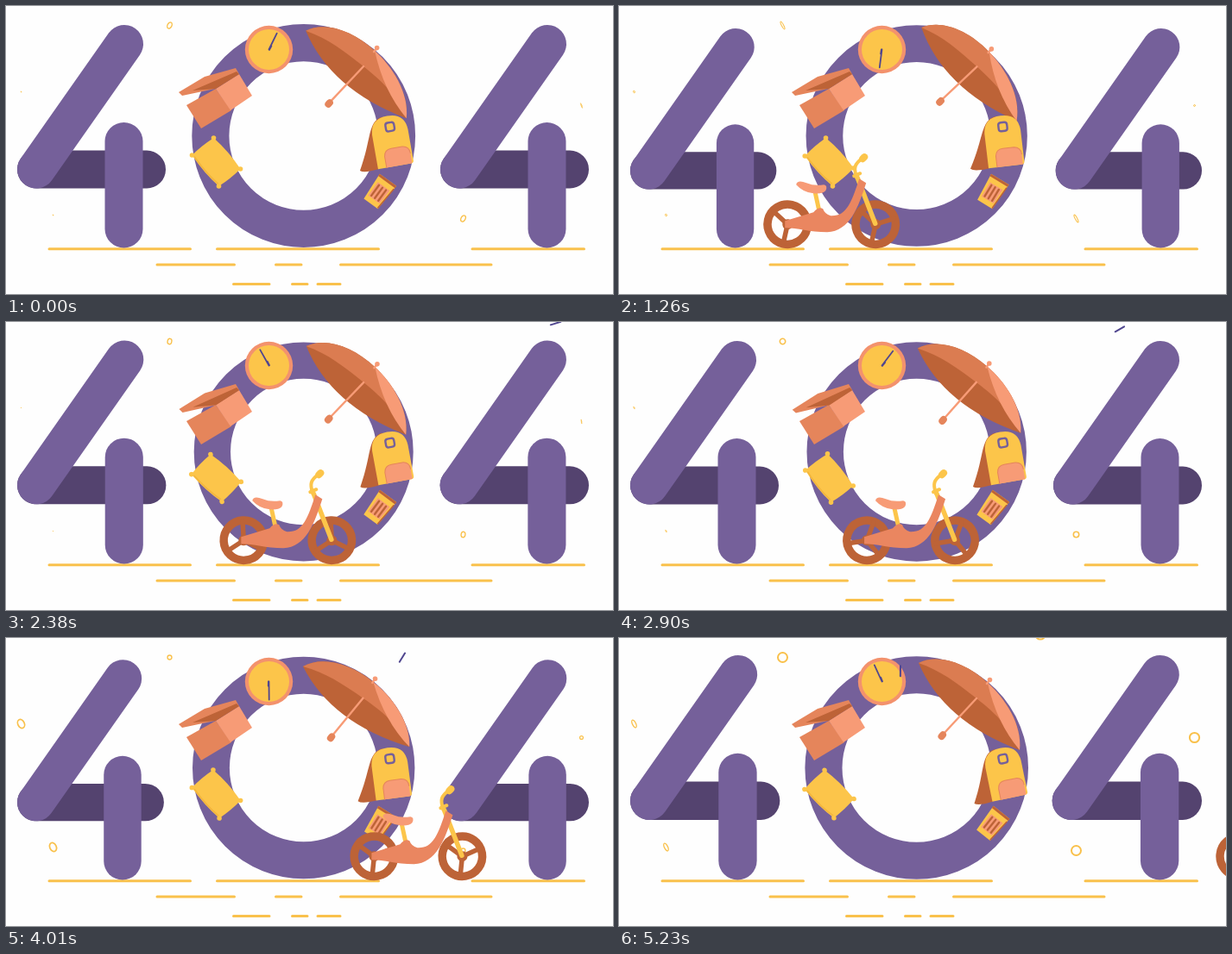
These frames come from a looping animation (703 px wide and 334 px high, 5.3 s). An HTML page with a canvas:

```html
<!DOCTYPE html>
<html lang="en">
<head>
<meta charset="utf-8">
<title>404</title>
<style>
  html, body { margin: 0; width: 100%; height: 100%; overflow: hidden; background: #fefefe; }
  canvas { display: block; }
</style>
</head>
<body>
<canvas id="stage" width="703" height="334"></canvas>
<script>
const ctx = document.getElementById('stage').getContext('2d');
const LOOP = 5300, HOLD = 180, TAU = Math.PI * 2, RAD = Math.PI / 180;
const PURPLE = '#75609a', SHADE = '#54436f', INK = '#50468f', YELLOW = '#fcc54a', GOLD = '#f9c14c',
      PEACH = '#f79b76', ORANGE = '#e5855b', RUST = '#bd6337';

// Smooth curve through one value per key time
const KEYS = [0, 1260, 1900, 2900, 3610, 4390, 5230];
function track(v) {
  const last = KEYS.length - 1;
  const slope = i => {
    const a = Math.max(0, i - 1), b = Math.min(last, i + 1);
    return (v[b] - v[a]) / (KEYS[b] - KEYS[a]);
  };
  return t => {
    let i = 0;
    while (i < last - 1 && t >= KEYS[i + 1]) i++;
    const h = KEYS[i + 1] - KEYS[i], u = (t - KEYS[i]) / h, w = 1 - u;
    return v[i] * (1 + 2 * u) * w * w + v[i + 1] * u * u * (3 - 2 * u)
      + h * u * w * (slope(i) * w - slope(i + 1) * u);
  };
}

const bikeX = track([-140, 195, 263, 287, 352, 511, 719]);
const sway = track([0, -4, 0, 0, -3.5, -2, 2]);
const pillowTurn = track([0, -2, -14, 2, 4, -6, -5]);
const lidTurn = track([0, 0, 0, -1.5, 1.5, -1.5, 0]);
const coinKinds = [
  { at: [[189.5, 22.5], [529.5, 246.5]],
    rx: track([2.5, 1.2, 1.8, 3.2, 5, .5, 5.5]),
    ry: track([3.8, 5, 3.8, 3.2, 5, .5, 5.5]),
    tilt: track([25, -28, 18, 0, 0, 0, 0]) },
  { at: [[17.5, 99.5], [54.5, 242.5]],
    rx: track([.2, .9, 0, .4, 1.6, 5.2, 2]),
    ry: track([.8, 1.4, 0, 1.5, 4.8, 5.2, 4.8]),
    tilt: track([-25, -25, -25, -25, -27, -25, -27]) },
  { at: [[666.5, 115.5], [488, -4]],
    rx: track([.4, 1, .5, .1, 1, 3, 5.6]),
    ry: track([3, 1, 4.5, .1, 1, 3, 5.6]),
    tilt: track([-20, -18, -15, 0, 0, 0, 0]) },
];

function place(x, y, deg, draw, scale = 1) {
  ctx.save();
  ctx.translate(x, y);
  ctx.rotate(deg * RAD);
  ctx.scale(scale, scale);
  draw();
  ctx.restore();
}
function fill(color, d) {
  ctx.fillStyle = color;
  ctx.fill(new Path2D(d));
}
function line(color, width, d) {
  ctx.strokeStyle = color;
  ctx.lineWidth = width;
  ctx.stroke(new Path2D(d));
}
function disc(color, x, y, r) {
  ctx.fillStyle = color;
  ctx.beginPath();
  ctx.arc(x, y, r, 0, TAU);
  ctx.fill();
}
function ring(color, width, x, y, rx, ry = rx, tilt = 0) {
  ctx.strokeStyle = color;
  ctx.lineWidth = width;
  ctx.beginPath();
  ctx.ellipse(x, y, rx, ry, tilt * RAD, 0, TAU);
  ctx.stroke();
}

// Left edge of the digit at x = 0, baseline at y = 0
function four() {
  line(SHADE, 44, 'M22-91H150');
  line(PURPLE, 44, 'M22-91L124-236.5');
  line(PURPLE, 44, 'M123.5-123.5V-22');
}

function clock(t) {
  disc('#f3926d', 304.5, 50.5, 27.7);
  disc(YELLOW, 304.5, 50.5, 23.5);
  place(304.5, 50.5, 26 + .128 * t, () => {
    line(INK, 1.8, 'M0 0V-21');
    line(INK, 1.8, 'M.6 0L.8-5');
  });
}

function box(t) {
  fill(ORANGE, 'M209 115L243 96L261 121L226 142Z');
  fill(PEACH, 'M243 96L270 79L285 104L260 121Z');
  place(266, 72, lidTurn(t), () => {
    fill(ORANGE, 'M-66 28L-36 10L0 0L4 7L-24 24L-62 32Z');
    fill(RUST, 'M-50 26L1 4L4 7L-23 24Z');
  });
}

function umbrella() {
  fill(RUST, 'M-62-49C-40-60-8-50 18-26C38-8 58 22 55 52Q-33 19-62-49Z');
  fill('#db7c51', 'M-62-49C-40-60-8-50 18-26L55 52C48 30 28 10 5-8C-18-26-36-40-62-49Z');
  fill(PEACH, 'M18-26C38-8 58 22 55 52Q28 20 18-26Z');
  line(PEACH, 2.4, 'M-34 34L5-8M17-25L20-29');
  disc(PEACH, 20.5, -29.5, 2.8);
  line(ORANGE, 8, 'M-35.5 36L-34 34.3');
}

function backpack() {
  fill(RUST, 'M-6-31C-24-28-22-8-42 26Q-38 30-20 28Z');
  fill(YELLOW, 'M-21 28V-12Q-20-31 0-31Q20-31 21-12V25Q21 28 18 28Z');
  fill(PEACH, 'M-11 28V15Q-10 7-2 7H11Q19 8 19 16V28Z');
  line(ORANGE, 1, 'M-11 28V15Q-10 7-2 7H11Q19 8 19 16');
  line(PURPLE, 2.4, 'M-1-23H3Q6-23 6-20V-16Q6-13 3-13H-1Q-4-13-4-16V-20Q-4-23-1-23Z');
}

function cup() {
  fill(YELLOW, 'M-12-17H12L10 17H-10Z');
  fill(RUST, 'M-12-17H12V-14H-12Z');
  fill(PEACH, 'M-8-8H9L8 11H-8Z');
  line(RUST, 2.4, 'M-5-6V9M0-6V9M5-6V9');
  line(RUST, 1.5, 'M11.5-12L9.5 16');
}

function pillow() {
  fill(YELLOW, 'M-3-28Q14-13 28 8Q17 19 3 28Q-14 13-28-8Q-17-19-3-28Z');
  line('#f3b53c', 1.5, 'M-25-6Q-12 13 2 25');
  for (const [x, y] of [[-3, -28], [28, 8], [3, 28], [-28, -8]]) disc(YELLOW, x, y, 2.8);
}

function wheel(x, turn) {
  place(x, 0, turn, () => {
    ring(RUST, 9.5, 0, 0, 23.2);
    disc(RUST, 0, 0, 6);
    for (let i = 0; i < 3; i++) {
      line(RUST, 5.5, 'M0 0V-22');
      ctx.rotate(TAU / 3);
    }
  });
}

// Rear hub at the origin
function bike(x) {
  const turn = (x - 277) / 28 / RAD;
  wheel(0, turn);
  wheel(102, turn);
  line(YELLOW, 5, 'M32-37L37-14');
  line(YELLOW, 5.5, 'M81-54L101.5-1');
  line(YELLOW, 4, 'M80-54C76-66 78-70 86-76');
  line(YELLOW, 4, 'M77-56L84-59');
  line(YELLOW, 8, 'M87-76L89-78');
  fill('#ea8660', 'M-3-4L30-14Q36-21 41-18Q43-12 50-10C68-9 74-25 83-53L91-48C82-20 72 8 46 9C25 9 12 4-3 4Z');
  fill(PEACH, 'M10-46Q11-52 22-48Q31-44 42-46Q47-45 44-39Q40-35 30-36Q18-37 10-46Z');
}

function ground() {
  line(GOLD, 3, 'M50 281.8H213.5M244.5 281.8H431.5M540 281.8H669.5M175 300H264.5M312.5 300H342'
    + 'M387.5 300H562M263.5 322.5H305M331.5 322.5H349M361 322.5H387');
}

function coins(t) {
  for (const kind of coinKinds) {
    const rx = Math.max(0, kind.rx(t)), ry = Math.max(0, kind.ry(t));
    const width = Math.min(2, .7 + rx * .28);
    if (ry < .3) continue;
    for (const [x, y] of kind.at) ring(GOLD, width, x, y, rx, ry, kind.tilt(t));
  }
}

function render(t) {
  ctx.clearRect(0, 0, 703, 334);
  ctx.lineCap = 'round';
  ground();

  const s = sway(t), size = 1 + s / 258;
  place(13, 280.5, 0, four, size);
  place(675 - 172 * size, 280.5, 0, four, size);
  const radius = 128.2 + 1.2 * Math.cos(TAU * t / 4900);
  ring(PURPLE, radius / 3, 344.7, 150.5, radius * 5 / 6);

  clock(t);
  box(t);
  place(409, 78, 3.7 * Math.sin(TAU * (t + 60) / LOOP), umbrella);
  place(446.8 + s * .3, 158, -10 - s * .8, backpack);
  place(432.5, 215.5, 36 + s * 1.2, cup);
  place(243.5, 181, pillowTurn(t), pillow);
  coins(t);

  const fall = t - 2900;
  place(580 - .109 * fall, 8.3 + .0129 * fall, -30 - .0255 * fall, () => line(INK, 2, 'M-6 0H6'));

  const x = bikeX(t);
  place(x, 253.2, 0, () => bike(x));
}

const start = performance.now();
function tick(now) {
  const t = Math.max(0, now - start) % LOOP;
  render(t < HOLD ? 0 : t);
  requestAnimationFrame(tick);
}
requestAnimationFrame(tick);
</script>
</body>
</html>
```
